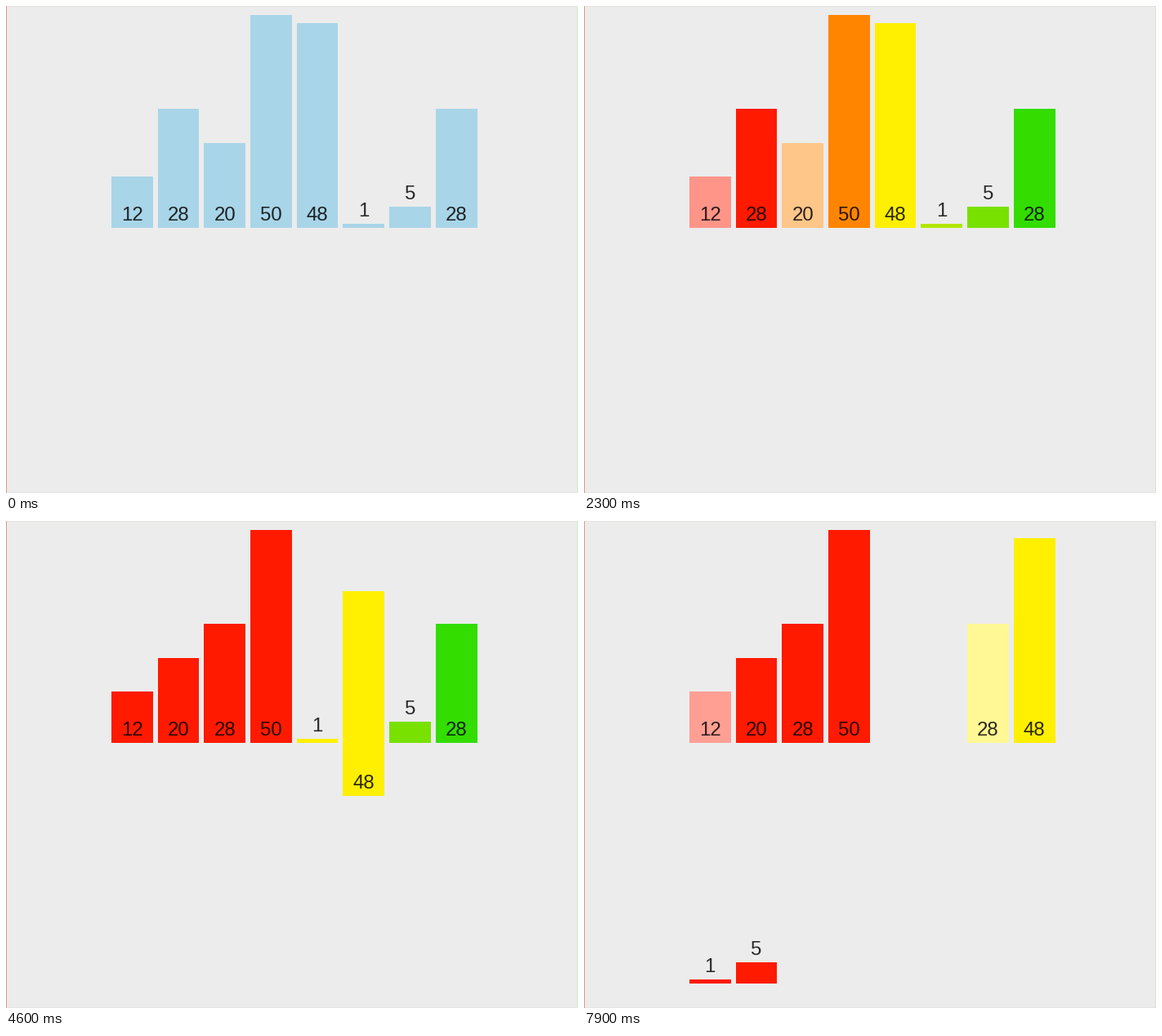
Animation, 700 px wide and 597 px high, one loop 8 s. Source, as a matplotlib script:

```python
import matplotlib.pyplot as plt
import numpy as np
from matplotlib.animation import FuncAnimation
from matplotlib.colors import to_rgb
from matplotlib.patches import Rectangle

W, H, DPI = 700, 597, 100
FRAMES, STEP_MS = 80, 100

VALUES = [12, 28, 20, 50, 48, 1, 5, 28]
N = len(VALUES)
HUES = [to_rgb(c) for c in ("#ff1a00", "#ff5000", "#ff8500", "#ffe400",
                            "#ffef00", "#b2e600", "#78e100", "#33dd00")]
BLUE = to_rgb("#a9d5e8")
LEFT, PITCH, BAR_W, UNIT = 128.8, 56.72, 50.8, 5.215
TOP_ROW, LOW_ROW = 271.8, 566.8

# Elapsed ms against number of finished sorting steps
CLOCK_MS = [0, 1600, 3100, 4600, 5800, 6600, 7900]
CLOCK_STEP = [0, 8, 16, 24.62, 31, 35, 42]


def pale(color):
    return tuple(0.42 * c + 0.58 for c in color)


def ease(p):
    return 4 * p ** 3 if p < 0.5 else 1 - 4 * (1 - p) ** 3


def sort_states():
    """Every step of the merge sort, one row (slot, base, r, g, b) per bar."""
    slot = list(range(N))
    base = [TOP_ROW] * N
    color = [BLUE] * N
    order = list(range(N))
    states = []

    def snap(heads=()):
        states.append(np.array([
            (slot[i], base[i], *(pale(color[i]) if i in heads else color[i]))
            for i in range(N)]))

    def merge(lo, mid, hi):
        left, right = order[lo:mid], order[mid:hi]
        group = color[left[0]]
        snap(left[:1] + right[:1])
        for k in range(lo, hi):
            take_left = left and (not right or
                                  VALUES[left[0]] <= VALUES[right[0]])
            bar = (left if take_left else right).pop(0)
            order[k], slot[bar] = bar, k
            base[bar], color[bar] = LOW_ROW, group
            snap(left[:1] + right[:1])
        for bar in order[lo:hi]:
            base[bar] = TOP_ROW
            snap()

    def split(lo, hi):
        if hi - lo > 1:
            mid = (lo + hi) // 2
            split(lo, mid)
            split(mid, hi)
            merge(lo, mid, hi)

    snap()
    color[:] = HUES
    snap()
    split(0, N)
    return states


STATES = sort_states()

fig = plt.figure(figsize=(W / DPI, H / DPI), dpi=DPI, facecolor="#ececec")
ax = fig.add_axes([0, 0, 1, 1])
ax.set_xlim(0, W)
ax.set_ylim(H, 0)
ax.axis("off")

for x, y, w, h, c in [(0, 0, W, 1, "#e5e3de"), (0, H - 1, W, 1, "#e4e4e3"),
                      (0, 0, 1, H, "#e39a84"), (W - 1, 0, 1, H, "#cfe9c8")]:
    ax.add_patch(Rectangle((x, y), w, h, fc=c, lw=0, antialiased=False))

bars, labels = [], []
for v in VALUES:
    bars.append(ax.add_patch(Rectangle((0, 0), BAR_W, v * UNIT, lw=0, zorder=2)))
    labels.append(ax.text(0, 0, str(v), family="Liberation Sans",
                          size=24 * 72 / DPI, color="black", alpha=0.83,
                          ha="center", va="baseline", zorder=3))


def draw(frame):
    s = np.interp(frame * STEP_MS, CLOCK_MS, CLOCK_STEP)
    k = int(s)
    rows = STATES[k] + (STATES[k + 1] - STATES[k]) * ease(s - k)
    for v, bar, label, (slot, base, *rgb) in zip(VALUES, bars, labels, rows):
        x, top = LEFT + slot * PITCH, base - v * UNIT
        bar.set_xy((x, top))
        bar.set_facecolor(np.clip(rgb, 0, 1))
        label.set_position((x + BAR_W / 2, (top if v < 10 else base) - 9))
    return bars + labels


anim = FuncAnimation(fig, draw, frames=FRAMES, interval=STEP_MS,
                     init_func=lambda: draw(0), repeat=True, repeat_delay=0,
                     blit=False)
plt.show()
```
